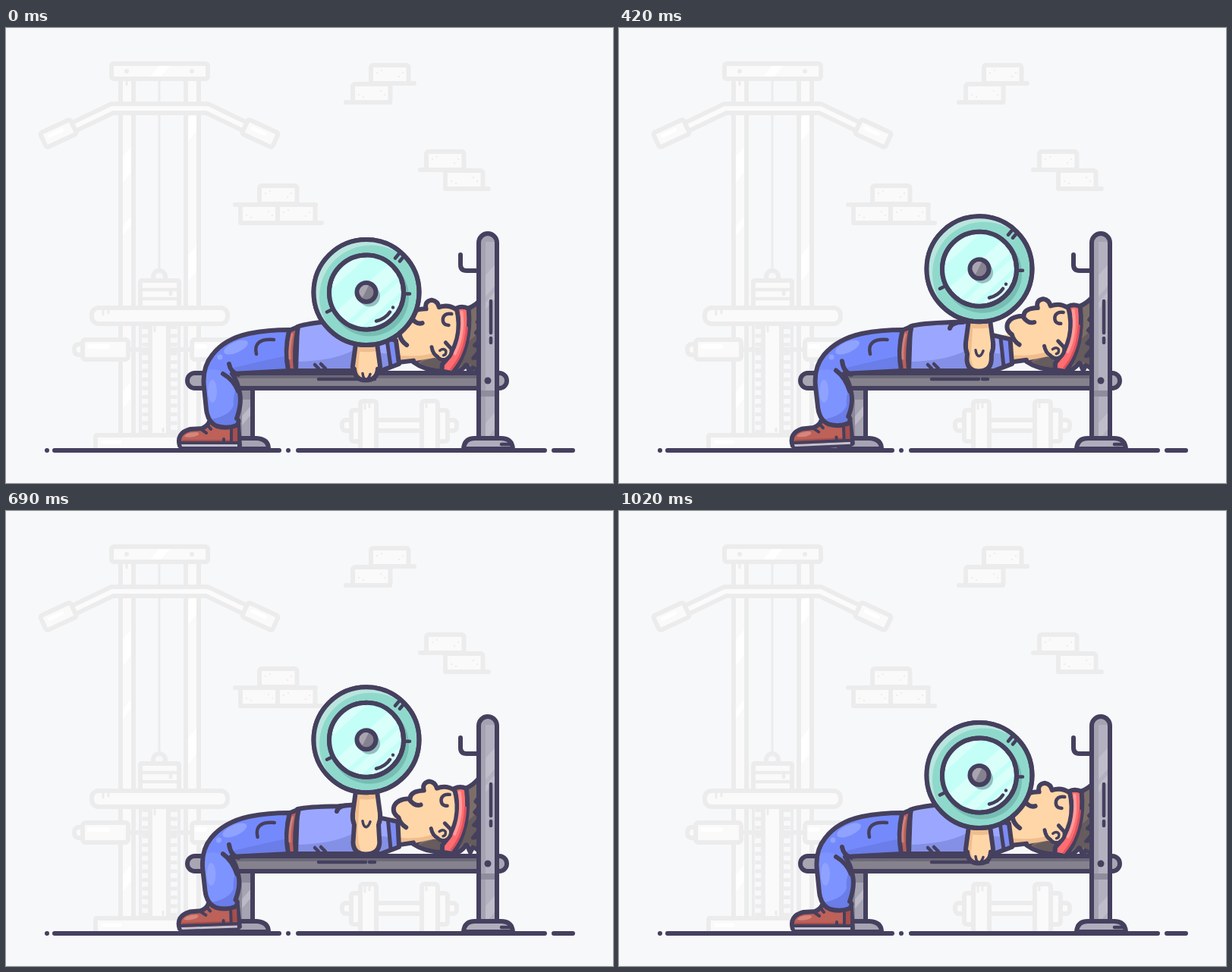
Write an HTML page that moves like this. It is 800 by 600 pixels and loops after 1260 ms.

```html
<!DOCTYPE html>
<html lang="en">
<head>
<meta charset="utf-8">
<title>Bench press</title>
<style>
  html, body { margin: 0; width: 100%; height: 100%; overflow: hidden; background: #f7f8fa; }
  svg { display: block; width: 800px; height: 600px; }
  .faint { stroke: #ececed; stroke-width: 6; fill: #fafafb; }
  .faint .line, .line { fill: none; }
  .faint .thin { stroke-width: 3; fill: none; }
  .ink { stroke: #45405e; stroke-width: 6; }
  .fine { stroke-width: 4.5; fill: none; }
  .flat { stroke: none; }
  g { stroke-linejoin: round; stroke-linecap: round; }
</style>
</head>
<body>
<svg viewBox="0 0 800 600">
  <defs>
    <clipPath id="pantsClip"><path data-shape="pants"/></clipPath>
    <clipPath id="shirtClip"><path data-shape="shirt"/></clipPath>
    <clipPath id="armClip"><path data-shape="arm"/></clipPath>
    <clipPath id="rimClip"><circle r="69"/></clipPath>
    <clipPath id="discClip"><circle r="48"/></clipPath>
    <clipPath id="postClip"><path d="M623 541V283a12 12 0 0 1 24 0V541z"/></clipPath>
  </defs>

  <!-- pull-down machine -->
  <g class="faint">
    <path class="thin" d="M202 70V320"/>
    <rect x="151" y="66" width="17" height="472"/>
    <rect x="237" y="66" width="17" height="472"/>
    <path class="flat" fill="#fff" d="M154 170l11-14v34l-11 14zM154 262l11-14v12l-11 14zM240 120l11-14v30l-11 14zM240 300l11-14v34l-11 14zM154 480l11-14v22l-11 14z"/>
    <path class="thin" d="M159 70v5"/>
    <rect x="139" y="47" width="127" height="20" rx="3"/>
    <path class="flat" fill="#fff" d="M190 64l12-14h14l-12 14z"/>
    <g class="flat" fill="#ececed"><circle cx="159" cy="57" r="3"/><circle cx="245" cy="57" r="3"/></g>
    <path class="line" style="stroke-width:18" d="M88 131L140 106H265L317 131"/>
    <path class="line" style="stroke-width:6;stroke:#fbfbfc" d="M88 131L140 106H265L317 131"/>
    <g transform="translate(69 139) rotate(-25)"><rect x="-22" y="-10.500" width="44" height="21" rx="3"/><path style="stroke:#fff;stroke-width:5" d="M-12-2H6"/></g>
    <g transform="translate(335 139) rotate(25)"><rect x="-22" y="-10.500" width="44" height="21" rx="3"/><path style="stroke:#fff;stroke-width:5" d="M-12-2H6"/></g>
    <circle class="line" cx="202" cy="328" r="8"/>
    <rect x="177" y="333" width="51" height="36" rx="2"/>
    <path class="line" style="stroke-width:4.500" d="M179 345H226M179 357H226M217 347v4"/>
    <path class="line" d="M161 424H190M214 424H245"/>
    <path class="line" style="stroke-width:4" d="M177 392V536M228 392V536"/>
    <path class="line" style="stroke-width:9;stroke-dasharray:5 6.500;stroke-linecap:butt" d="M184 392V536M221 392V536"/>
    <rect x="190" y="390" width="24" height="148"/>
    <path class="thin" d="M207 528v4M196 394v6"/>
    <rect x="113" y="369" width="179" height="21" rx="9"/>
    <path class="thin" d="M128 373v5M135 373v3"/>
    <path d="M101 417H95q-5 1-5 7t5 7h6z"/>
    <rect x="101" y="411" width="60" height="26" rx="4"/>
    <rect x="245" y="411" width="60" height="26" rx="4"/>
    <path style="stroke:#fff;stroke-width:6" d="M110 420H134M252 420H262"/>
    <path d="M118 553V539q0-2 2-2H286V553"/>
    <path style="stroke:#fff;stroke-width:5" d="M128 546H150"/>
  </g>

  <!-- dumbbell -->
  <g class="faint">
    <rect x="486" y="517" width="64" height="14"/>
    <rect x="443" y="517" width="14" height="14" rx="5"/>
    <rect x="580" y="517" width="14" height="14" rx="5"/>
    <rect x="455" y="504" width="14" height="41" rx="3"/>
    <rect x="568" y="504" width="14" height="41" rx="3"/>
    <path d="M467 553V496q0-4 4-4h13q4 0 4 4V553M548 553V496q0-4 4-4h13q4 0 4 4V553"/>
    <path class="thin" d="M473 496v6M479 496v4M554 496v4"/>
  </g>

  <g class="faint" id="bricks">
    <path class="line" d="M484 73H538M448 98H506M546 187H604M579 212H636M302 233H408M309 257H416"/>
  </g>

  <g class="ink">
    <path class="line" d="M54 557h.01M64 557H360M372 557h.01M385 557H710M722 557H747"/>

    <!-- bench -->
    <path fill="#a6a3b3" d="M300 475H325V541H300z"/>
    <path class="flat" fill="#8b8899" d="M303 478h19v12H303zM303 490h8v50h-8z"/>
    <path class="flat" fill="#bdbac8" d="M311 512l11-13v12l-11 13z"/>
    <path fill="#a6a3b3" d="M290 555V541H330Q346 542 346 555z"/>
    <rect x="239" y="455" width="421" height="20" rx="10" fill="#85828e"/>
    <path class="flat" fill="#6d6a78" d="M300 458H622v4H300z"/>
    <path class="flat" fill="#a9a6b3" d="M249 458h12v14h-12a7 7 0 0 1 0-14zM650 458a7 7 0 0 1 0 14z"/>
    <path class="fine" d="M412 463H474M479 463H486"/>
    <path class="line" d="M599 299V312Q599 320 607 320H622"/>

    <!-- head -->
    <g id="head">
      <path fill="#7b6d68" d="M604 365Q615 361 624 349L636 345V448L622 446 616 441 612 449 607 438Q600 450 588 451L575 449Q552 449 537 439L560 424z"/>
      <path class="flat" fill="#665b5d" d="M606 410Q602 432 592 447L606 436 622 442 622 395zM545 439l24-9 8 16q-18 1-32-7z"/>
      <path class="fine" d="M622 376l-4 6 4 3M622 390l-5 6 5 4M622 406l-6 7 6 2M621 422l-6 8 7-1"/>
      <path class="flat" fill="#ffd6a8" d="M515 403Q508 397 511 389Q517 380 533 379Q533 368 549 368Q548 358 557 356Q564 357 567 365Q580 361 591 367Q599 405 577 434L560 431 537 437 505 444V405z"/>
      <path class="flat" fill="#efbd8e" d="M510 430Q540 434 565 425L568 431 537 438 505 445z"/>
      <path class="line" d="M537 437L519 440M527 417Q519 412 517 404Q508 398 511 389Q515 380 530 379Q538 390 546 387M532 379Q532 369 550 368Q547 358 557 356Q565 357 567 365Q579 360 590 367"/>
      <path class="fine" d="M584 373Q575 372 573 379Q572 388 581 388"/>
      <path fill="#ff6d70" d="M590 365Q598 361 606 365Q613 415 589 451L575 449V440Q603 408 590 365z"/>
      <path class="line" style="stroke:#ff9b98;stroke-width:4" d="M597 370Q602 400 591 425"/>
      <path class="line" style="stroke:#dd525e;stroke-width:3" d="M605 390Q604 425 587 446"/>
      <circle class="flat" cx="577" cy="424" r="10" fill="#ffd6a8"/>
      <path class="line" style="stroke-width:5" d="M560 418Q562 427 568 430Q573 436 580 433Q588 428 586 419L578 411"/>
      <path class="fine" style="stroke-width:3.500" d="M571 422Q576 418 579 422Q580 427 576 428"/>
    </g>

    <!-- shoe -->
    <g id="shoe">
      <path fill="#bd6159" d="M229 551Q224 534 243 529L258 528Q266 525 268 519L306 522 308 551Q306 553 300 553H232z"/>
      <path class="flat" fill="#a64e4d" d="M232 543H305v3H232zM296 526h9v18h-9z"/>
      <path class="flat" fill="#d5867d" d="M235 539q2-6 17-6 5 2-1 5-8 3-16 1z"/>
      <path class="flat" fill="#c5c2d1" d="M231 549H305v3H232z"/>
      <path class="line" style="stroke-width:4" d="M230 547H306M297 530V544M287 542v3M257 529l7 5M265 523l5 6"/>
    </g>

    <!-- trousers -->
    <path class="flat" fill="#748afc" data-shape="pants"/>
    <g class="flat" clip-path="url(#pantsClip)">
      <path fill="#6a7de8" d="M300 448Q345 437 380 430V460H300z"/>
      <path fill="#7d93ff" d="M255 455Q275 445 290 456Q310 475 308 535H255z"/>
      <path fill="#6a7de8" d="M309 468Q298 480 300 497Q296 512 266 517L272 535H312z"/>
      <g id="gloss" fill="#8fa2ff">
        <ellipse cx="303" cy="421" rx="17" ry="7" transform="rotate(-24 303 421)"/>
        <ellipse cx="272" cy="479" rx="6" ry="15"/>
        <circle cx="282" cy="434" r="3.500"/>
      </g>
    </g>
    <path class="line" data-shape="pants"/>
    <path class="line" data-shape="knee"/>
    <path class="fine" data-shape="pocket"/>

    <!-- shirt -->
    <path class="flat" fill="#9ba7ff" data-shape="shirt"/>
    <g class="flat" clip-path="url(#shirtClip)">
      <path fill="#8490e6" d="M380 440Q430 440 460 424L505 430 520 425V456H380z"/>
      <path data-shape="collar" fill="#7c8bf3"/>
    </g>
    <path class="line" data-shape="shirt"/>
    <path class="line" style="stroke-width:5" data-shape="seam"/>
    <path class="fine" d="M407 444l5 5M415 443l6 6"/>
    <path class="line" d="M436 396Q438 388 453 388"/>
    <path fill="#b95f5b" data-shape="belt"/>
    <path class="line" style="stroke:#cf8179;stroke-width:3" data-shape="shine"/>

    <!-- upright -->
    <path fill="#b0adbd" d="M603 555Q604 541 618 541H652Q667 541 668 555z"/>
    <path class="fine" d="M653 549H666"/>
    <g class="flat" clip-path="url(#postClip)" fill="#c0bdca">
      <path fill="#a5a2b2" d="M620 268H650V541H620z"/>
      <path fill="#b3b0c0" d="M632 282h13V541H632z"/>
      <path d="M632 326l15-17v28l-15 17zM632 362l15-17v9l-15 17zM632 521l15-17v22l-15 17z"/>
      <path fill="#8f8c9d" d="M626 478h19v8H626z"/>
    </g>
    <path class="line" d="M623 541V283a12 12 0 0 1 24 0V541z"/>
    <path class="fine" d="M639 360V402M639 409V415"/>
    <circle class="flat" cx="635" cy="465" r="4.500" fill="#45405e"/>

    <!-- arm -->
    <path class="flat" fill="#ffd6a8" data-shape="arm"/>
    <path class="flat" fill="#efbd8e" clip-path="url(#armClip)" data-shape="shade"/>
    <path class="line" data-shape="arm"/>
    <path class="fine" style="stroke-width:3.500" data-shape="elbow"/>

    <!-- weight -->
    <g id="weight">
      <circle r="69.500" fill="#8fd9cc"/>
      <g class="flat" clip-path="url(#rimClip)">
        <path fill="#b9e5de" fill-rule="evenodd" d="M-80-80H80V80H-80zM-62 6a68 68 0 0 0 136 0a68 68 0 0 0-136 0"/>
        <circle cx="4" cy="6" r="52" fill="#77bdb3"/>
      </g>
      <circle class="line" r="69.500"/>
      <circle r="49" fill="#d8fffa"/>
      <g class="flat" clip-path="url(#discClip)" fill="#c3fff7">
        <path transform="rotate(-42)" d="M-60-34H60v26H-60zM-60 12H60v6H-60zM-60 30H60v6H-60z"/>
      </g>
      <circle class="line" r="49"/>
      <circle class="flat" cx="4" cy="5" r="14" fill="#92bfc0"/>
      <circle r="12.500" fill="#85818f"/>
      <path class="flat" fill="#a8a5b1" d="M-9 2A9 9 0 0 1 3-9L-5 7z"/>
      <path class="fine" d="M38-45l5-6M44-41l5-6M52 2h5M-52 26l6-3M13 38Q25 35 31 26M35 20h.01"/>
    </g>
  </g>
</svg>
<script>
const LOOP = 1260, STEP = 30, REST = 348.5, TOP = 289;

// [time, value] pairs joined by straight lines
const liftKeys = [[0, REST], [60, 350.5], [120, 353], [180, 352], [240, 345.5], [300, 336.5],
                  [420, 317.7], [600, TOP], [1020, REST], [LOOP, REST]];
const legKeys = [[0, 0], [180, 0], [300, .35], [420, .75], [540, 1], [600, 1], [780, .25], [900, 0], [LOOP, 0]];

function sample(keys, t) {
  const i = keys.findIndex(k => k[0] > t);
  const [t0, a] = keys[i - 1], [t1, b] = keys[i];
  return a + (b - a) * (t - t0) / (t1 - t0);
}

const byId = id => document.getElementById(id);
const parts = {};
document.querySelectorAll('[data-shape]').forEach(el => (parts[el.dataset.shape] ||= []).push(el));
const shape = (name, d) => parts[name].forEach(el => el.setAttribute('d', d));
const move = (id, transform) => byId(id).setAttribute('transform', transform);

function drawBricks() {
  const spots = [[481, 49], [457, 74], [554, 163], [579, 188], [334, 208], [309, 233], [358, 233]];
  const specks = [[8, 10], [14, 7], [37, 15], [42, 10]];
  byId('bricks').innerHTML += spots.map(([x, y], n) =>
    `<rect x="${x}" y="${y}" width="49.500" height="24" rx="3"/>` +
    specks.map(([a, b]) => `<circle class="flat" fill="#e8e8e9" cx="${x + a}" cy="${y + (n % 2 ? 24 - b : b)}" r="1"/>`).join('')
  ).join('');
}

function drawArm(p) {
  const bottom = Math.max(452.5, p + 116);
  const side = bottom - 15, crook = Math.min(p + 112, side), wide = p + 97;
  const mid = (wide + crook) / 2;
  const bulge = Math.min(1, (side - crook) / 30);
  const left = 459 - 2 * bulge, right = 490 + 3 * bulge;
  shape('arm', `M462 ${p + 60}L457 ${wide}Q456 ${mid} 459 ${crook}L${left} ${side}` +
    `Q${left + 1} ${bottom} 474 ${bottom}Q${right - 1} ${bottom} ${right} ${side}` +
    `L491 ${crook}Q494 ${mid} 493 ${wide}L488 ${p + 60}`);
  shape('shade', `M450 ${p + 60}H500V${p + 76}Q474 ${p + 80} 466 ${p + 78}L464 ${crook}Q462 ${side} 470 ${bottom}H450z`);
  shape('elbow', `M470 ${p + 107}Q471 ${p + 115} 475 ${p + 115}Q478 ${p + 114} 480 ${p + 108}`);
}

function drawBody(u, v) {
  const x = -2.5 * v, y = -3.5 * v;
  shape('pants', `M${373 + u} 398Q345 398 320 403Q288 410 ${272 + x} 431Q${258 + x} 448 ${261 + x} 474L${264 + x} ${503 + y}` +
    `Q${266 + x} ${520 + y} ${278 + x} ${525 + y}Q${292 + x} ${529 + y} ${304 + x} ${524 + y}Q${309 + x} ${518 + y} ${304 + x} ${515 + y}` +
    `Q${311 + x} 495 ${308 + x} 481Q${305 + x} 465 ${298 + x} 456L373 452z`);
  shape('knee', `M294 ${443 - 5 * v}Q296 454 306 457M286 ${456 - 6 * v}Q${300 + x} ${464 - 5 * v} ${306 + x} 479`);
  shape('pocket', `M${330 + 2 * u} 430Q${325 + 2 * u} 409 ${353 + u} 411`);
  move('gloss', `translate(${x} 0)`);

  const neck = 412 - 3 * u;
  shape('shirt', `M384 ${394 - u}Q396 ${389 + u} 438 ${386 + 4 * u}L462 387L492 ${406 - 2 * u}L${514 + 3 * u} ${neck}L518 443Q505 448 494 452H382z`);
  shape('collar', `M${502 + 2 * u} ${neck - 4}L507 456H525V${neck - 4}z`);
  shape('seam', `M${502 + 2 * u} ${neck - 1}L507 446`);
  shape('belt', `M${373 + u} ${399 - u}L${385 + u} ${394 - u}Q379 425 382 452H372Q367 425 ${373 + u} ${399 - u}z`);
  shape('shine', `M${377 + u} 404Q373 420 374 436`);
  move('shoe', `rotate(${-3.2 * v} 230 553)`);
  move('head', `rotate(${2.9 * (1 - u)} 505 440)`);
}

function draw(t) {
  const p = sample(liftKeys, t);
  const u = Math.max(0, (REST - p) / (REST - TOP));
  move('weight', `translate(475 ${p})`);
  drawArm(p);
  drawBody(u, sample(legKeys, t));
}

const start = performance.now();

function tick() {
  const elapsed = performance.now() - start;
  draw(Math.floor(elapsed % LOOP / STEP) * STEP);
  requestAnimationFrame(tick);
}

drawBricks();
tick();
</script>
</body>
</html>
```
